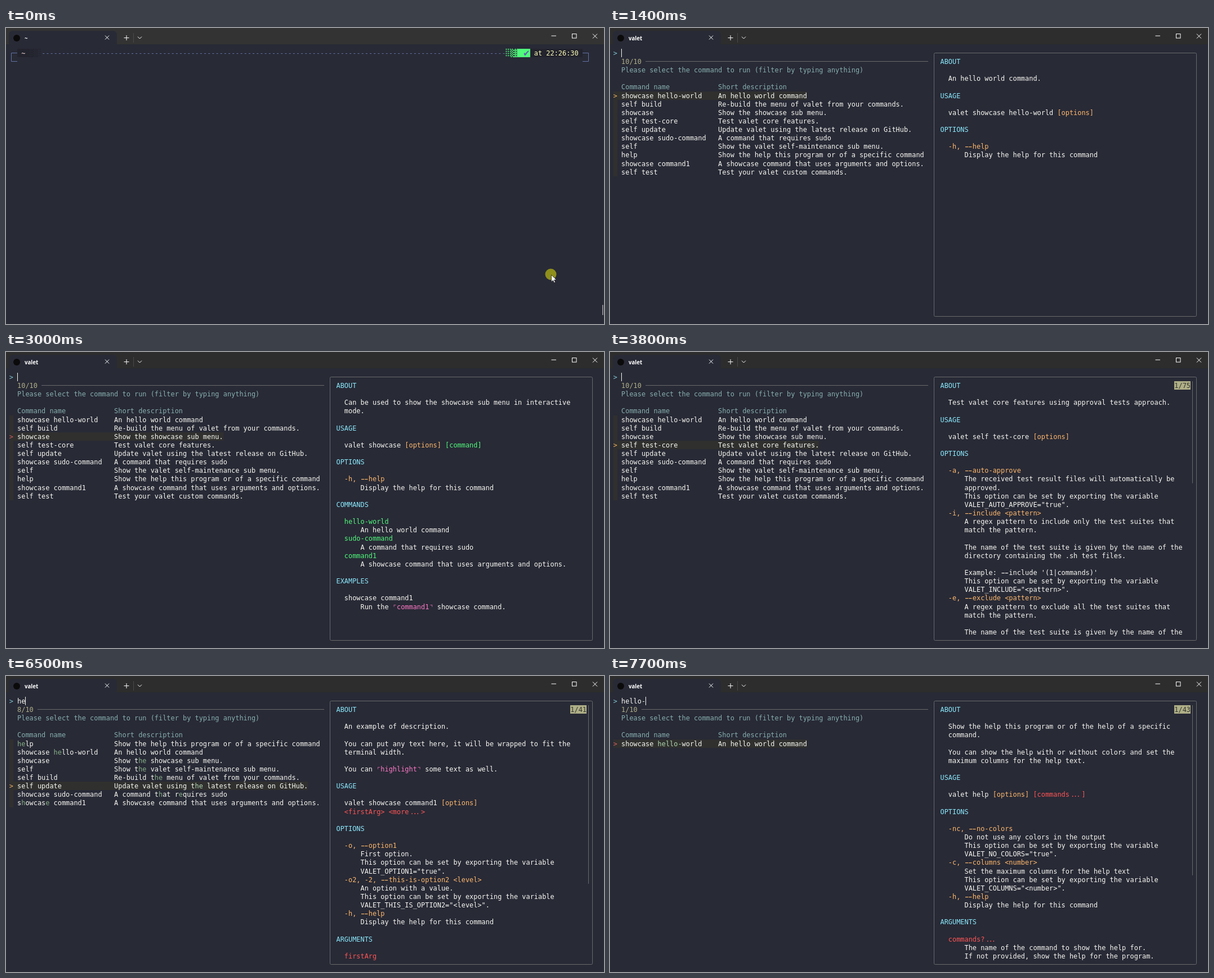
Animation, 1062 px wide and 527 px high, one loop 8000 ms. Source, as an HTML page with a canvas:

```html
<!DOCTYPE html>
<html lang="en">
<head>
<meta charset="utf-8">
<title>Terminal menu</title>
<style>
html, body { margin: 0; width: 100%; height: 100%; overflow: hidden; background: #282a36; }
canvas { display: block; }
</style>
</head>
<body>
<canvas id="stage" width="1062" height="527"></canvas>
<script>
const ctx = document.getElementById('stage').getContext('2d');
const LOOP = 8000, CELL = 7.17, ROW = 15.14, LEFT = 5.7, TOP = 36.9;
const BG = '#282a36', FG = '#f8f8f2', TEAL = '#87afaf', OLIVE = '#afaf87', ORANGE = '#ffb86c',
  RED = '#ff5555', BLUE = '#6272a4', LINE = '#696a6c', SHADE = '#30302f', DARK = '#22232d', GREEN = '#50fa7b';
const INLINE = { o: ORANGE, g: GREEN, r: RED, p: '#ff79c6' };

const ITEMS = [
  ['showcase hello-world', 'An hello world command'],
  ['self build', 'Re-build the menu of valet from your commands.'],
  ['showcase', 'Show the showcase sub menu.'],
  ['self test-core', 'Test valet core features.'],
  ['self update', 'Update valet using the latest release on GitHub.'],
  ['showcase sudo-command', 'A command that requires sudo'],
  ['self', 'Show the valet self-maintenance sub menu.'],
  ['help', 'Show the help this program or of a specific command'],
  ['showcase command1', 'A showcase command that uses arguments and options.'],
  ['self test', 'Test your valet custom commands.'],
].map(([name, text]) => name.padEnd(24) + text);

// Help pages: {x...} colours a span, with x a key of INLINE.
const helpFlag = `  -h, --help
      Display the help for this command`;
const exported = setting => `      This option can be set by exporting the variable
      VALET_${setting}.`;
const page = (about, usage, rest, total) => ({
  total,
  lines: `ABOUT\n\n${about}\n\nUSAGE\n\n  valet ${usage}\n\nOPTIONS\n\n${rest}`.split('\n'),
});

const PAGES = [
  page('  An hello world command.', 'showcase hello-world {o[options]}', helpFlag),
  page(`  This command can be used to re-build the menu / help /
  options / arguments in case you have modified, added or
  removed a valet command definition.

  Please check the examples in the examples.d directory to
  learn how to create your own commands.`, 'self build {o[options]}', `  -c, --core-only
      Build only the core commands.
${exported('CORE_ONLY="true"')}
  -o, --output <path>
      The path to the folder in which to write the
      generated commands file.
${exported('OUTPUT="<path>"')}
${helpFlag}`),
  page(`  Can be used to show the showcase sub menu in interactive
  mode.`, 'showcase {o[options]} {g[command]}', `${helpFlag}

COMMANDS

  {ghello-world}
      An hello world command
  {gsudo-command}
      A command that requires sudo
  {gcommand1}
      A showcase command that uses arguments and options.

EXAMPLES

  showcase command1
      Run the {p⌜command1⌝} showcase command.`),
  page('  Test valet core features using approval tests approach.', 'self test-core {o[options]}', `  -a, --auto-approve
      The received test result files will automatically be
      approved.
${exported('AUTO_APPROVE="true"')}
  -i, --include <pattern>
      A regex pattern to include only the test suites that
      match the pattern.

      The name of the test suite is given by the name of the
      directory containing the .sh test files.

      Example: --include '(1|commands)'
${exported('INCLUDE="<pattern>"')}
  -e, --exclude <pattern>
      A regex pattern to exclude all the test suites that
      match the pattern.

      The name of the test suite is given by the name of the`, 75),
  page('  Update valet using the latest release on GitHub.', 'self update {o[options]}', helpFlag),
  page(`  Before starting this command, valet will check if sudo is
  available.

  If so, it will require the user to enter the sudo password
  and use sudo inside the command`, 'showcase sudo-command {o[options]}', helpFlag),
  page(`  Can be used to show the valet self-maintenance sub menu in
  interactive mode.`, 'self {o[options]} {g[command]}', `${helpFlag}

COMMANDS

  {gbuild}
      Re-build the menu of valet from your commands.
  {gtest-core}
      Test valet core features.
  {gupdate}
      Update valet using the latest release on GitHub.
  {gtest}
      Test your valet custom commands.

EXAMPLES

  self build
      Re-build the menu of valet.
  self test`, 31),
  page(`  Show the help this program or of the help of a specific
  command.

  You can show the help with or without colors and set the
  maximum columns for the help text.`, 'help {o[options]} {r[commands...]}', `  -nc, --no-colors
      Do not use any colors in the output
${exported('NO_COLORS="true"')}
  -c, --columns <number>
      Set the maximum columns for the help text
${exported('COLUMNS="<number>"')}
${helpFlag}

ARGUMENTS

  {rcommands?...}
      The name of the command to show the help for.
      If not provided, show the help for the program.`, 43),
  page(`  An example of description.

  You can put any text here, it will be wrapped to fit the
  terminal width.

  You can {p⌜highlight⌝} some text as well.`, 'showcase command1 {o[options]}\n  {r<firstArg> <more...>}', `  -o, --option1
      First option.
${exported('OPTION1="true"')}
  -o2, -2, --this-is-option2 <level>
      An option with a value.
${exported('THIS_IS_OPTION2="<level>"')}
${helpFlag}

ARGUMENTS

  {rfirstArg}`, 41),
];

const ALL = ITEMS.map((_, i) => i);
const COMMANDS = ['valet', 'vcs_info', 'vdir', 'vi', 'view', 'vigr', 'vim', 'vimdiff', 'vipw', 'vmstat', 'vncserver'];
const MATCHES = ['external command', COMMANDS.map(c => c.padEnd(10)).join('')];
const RECENT = ['valet', 'valet showcase', 'valet showcase command1'];

const shell = (at, typed, hints = []) => ({ at, typed, hints });
const menu = (at, preview, selected, query = '', order = ALL) => ({ at, preview, selected, query, order });
// The preview trails the selection while the user types.
const STATES = [
  shell(0, ''), shell(200, 'v'), shell(400, 'v', MATCHES), shell(600, 'va', MATCHES),
  shell(800, 'val'), shell(1000, 'vale', RECENT), shell(1200, 'valet'),
  menu(1400, 0, 0), menu(2200, 1, 1), menu(3000, 2, 2), menu(3800, 3, 3), menu(4600, 4, 4), menu(5400, 5, 5),
  menu(6200, 5, 5, 'h', [7, 0, 6, 2, 5, 8, 1, 4]),
  menu(6500, 8, 5, 'he', [7, 0, 2, 6, 1, 4, 5, 8]),
  menu(6800, 4, 4, 'hel', [7, 0, 4, 1, 6]),
  menu(7100, 6, 3, 'hell', [0, 4, 6, 7]),
  menu(7400, 7, 2, 'hello', [0, 4, 7]),
  menu(7700, 7, 0, 'hello-', [0]),
];

const colX = col => LEFT + col * CELL;
const rowY = row => TOP + row * ROW;

function rect(color, x, y, w, h) {
  ctx.fillStyle = color;
  ctx.fillRect(x, y, w, h);
}

function fillCells(color, col, row, count) {
  const x = Math.round(colX(col)), y = Math.round(rowY(row));
  rect(color, x, y, Math.round(colX(col + count)) - x, Math.round(rowY(row + 1)) - y);
}

function stroke(color, ...points) {
  ctx.strokeStyle = color;
  ctx.lineWidth = 1;
  ctx.beginPath();
  for (const [x, y] of points) ctx.lineTo(x, y);
  ctx.stroke();
}

function disc(color, x, y, r) {
  ctx.fillStyle = color;
  ctx.beginPath();
  ctx.arc(x, y, r, 0, 7);
  ctx.fill();
}

// One glyph per cell; "--" and "..." are pulled together as ligatures.
function print(text, col, row, color = FG) {
  const y = Math.round(rowY(row) + 11.9);
  ctx.font = "11.9px 'DejaVu Sans Mono', monospace";
  for (let i = 0; i < text.length; i++) {
    const x = colX(col + i);
    ctx.fillStyle = color;
    if (text.startsWith('--', i)) {
      ctx.fillRect(x + 1.5, y - 4, 5.2, 1.2);
      ctx.fillRect(x + 7.7, y - 4, 5.2, 1.2);
      i++;
    } else if (text.startsWith('...', i)) {
      for (let k = 0; k < 3; k++) ctx.fillText('.', x + k * CELL + 2 - k * 2, y);
      i += 2;
    } else if (text[i] !== ' ') {
      ctx.fillText(text[i], x, y);
    }
  }
}

function caret(col, row) {
  rect(FG, Math.round(colX(col)), Math.round(rowY(row)), 1, 15);
}

// Dithered shade block; level 1 to 3 quarters.
function shade(color, col, level) {
  const w = CELL / 4, h = ROW / 8;
  for (let y = 0; y < 8; y++) {
    for (let x = 0; x < 4; x++) {
      const on = level === 2 ? (x + y) % 2 === 0 : (level === 3) !== (x % 2 === 0 && y % 2 === 0);
      if (on) rect(color, colX(col) + x * w, rowY(0) + y * h, w, h);
    }
  }
}

function drawWindow(title, barColor) {
  rect(BG, 0, 0, 1062, 527);
  rect(barColor, 0, 0, 1062, 29);
  ctx.fillStyle = BG;
  ctx.beginPath();
  ctx.roundRect(5, 5, 192, 25, [7, 7, 0, 0]);
  ctx.fill();
  disc('#0b0b0b', 19, 18, 6);
  ctx.font = "700 9.7px 'Open Sans', sans-serif";
  ctx.fillStyle = '#fff';
  ctx.fillText(title, 33, 22);
  const cross = (x, y, r) => {
    stroke('#fff', [x - r, y - r], [x + r, y + r]);
    stroke('#fff', [x - r, y + r], [x + r, y - r]);
  };
  cross(179.5, 17, 3.5);
  cross(1046, 14.5, 4);
  stroke('#fff', [209.5, 17.5], [218.5, 17.5]);
  stroke('#fff', [214, 13], [214, 22]);
  stroke('#4a4a4a', [226.5, 9], [226.5, 26]);
  stroke('#fff', [234, 15.5], [237.5, 19], [241, 15.5]);
  stroke('#fff', [968.5, 14], [977, 14]);
  ctx.strokeRect(1005.5, 10.5, 7.5, 7.5);
}

function drawShell({ at, typed, hints }) {
  drawWindow('~', at ? '#2d2d2d' : '#333333');
  stroke(BLUE, [20, 44.5], [9.5, 44.5], [9.5, 59.5], [20, 59.5]);
  stroke(BLUE, [1024, 44.5], [1034.5, 44.5], [1034.5, 59.5], [1024, 59.5]);
  fillCells(DARK, 2, 0, 3);
  print('~', 3, 0, '#ffdfdf');
  for (let k = 0; k < 3; k++) {
    shade(DARK, 5 + k, 3 - k);
    shade(GREEN, 123 + k, 1 + k);
  }
  for (let col = 8; col < 123; col++) rect(BLUE, colX(col) + 2.2, 45, 3, 1);
  fillCells(GREEN, 126, 0, 3);
  ctx.font = "15px 'DejaVu Sans', sans-serif";
  ctx.fillStyle = '#5f5faf';
  ctx.fillText('✔', 918, 50);
  fillCells(DARK, 129, 0, 13);
  print('at 22:26:30', 130, 0, '#ffffb8');
  print(typed, 3, 1);
  hints.forEach((hint, i) => print(hint, 0, 2 + i));
  rect('#a3a3a3', 1059, 493, 1.5, 18);
  if (typed) caret(3 + typed.length, 1);
  else drawPointer(967.5, 438.5);
}

function drawPointer(x, y) {
  disc('#8f8f1c', x, y, 10);
  ctx.save();
  ctx.translate(x + 1, y + 1);
  const arrow = new Path2D('M0 0V12.5L3 9.8 5 14 7 13 5 9H9Z');
  ctx.fillStyle = '#fff';
  ctx.strokeStyle = '#222';
  ctx.lineWidth = 0.8;
  ctx.fill(arrow);
  ctx.stroke(arrow);
  ctx.restore();
}

// Tightest fuzzy match, preferring word starts.
function findMatch(line, query) {
  let best = [], bestSpan = Infinity;
  for (let start = 0; query && start < line.length; start++) {
    if (line[start] !== query[0]) continue;
    const found = [start];
    for (const ch of query.slice(1)) found.push(line.indexOf(ch, found.at(-1) + 1));
    if (found.some((p, i) => i && p <= found[i - 1])) continue;
    const span = found.at(-1) - start - (start === 0 || line[start - 1] === ' ' ? 0.5 : 0);
    if (span < bestSpan) [best, bestSpan] = [found, span];
  }
  return best;
}

function drawList({ at, query, order, selected }) {
  const count = `${order.length}/${ITEMS.length}`;
  print('>', 0, 0, '#7fc7d0');
  print(query, 2, 0);
  if (at !== 5400) caret(2 + query.length, 0);
  print(count, 2, 1, OLIVE);
  stroke(LINE, [colX(3 + count.length), 59.5], [565, 59.5]);
  print('Please select the command to run (filter by typing anything)', 2, 2, TEAL);
  print('Command name'.padEnd(24) + 'Short description', 2, 4, TEAL);
  order.forEach((item, i) => {
    const line = ITEMS[item], row = 5 + i, current = i === selected;
    fillCells(SHADE, 0, row, current ? line.length + 2 : 1);
    if (current) print('>', 0, row, at === 3000 || at === 7700 ? '#d75f5f' : '#f0b05c');
    const hits = findMatch(line, query);
    [...line].forEach((ch, k) =>
      print(ch, 2 + k, row, !hits.includes(k) ? FG : current ? '#afd7af' : '#87af87'));
  });
}

function drawPreview({ lines, total }) {
  ctx.strokeStyle = LINE;
  ctx.lineWidth = 1;
  ctx.beginPath();
  ctx.roundRect(575.5, 44.5, 466, 469, 2);
  ctx.stroke();
  lines.forEach((line, i) => {
    const base = /^[A-Z]+$/.test(line) ? '#8be9fd' : /^  -/.test(line) ? ORANGE : FG;
    let col = 81;
    for (const part of line.split(/(\{[^}]*\})/)) {
      const marked = part[0] === '{';
      const text = marked ? part.slice(2, -1) : part;
      print(text, col, 1 + i, marked ? INLINE[part[1]] : base);
      col += text.length;
    }
  });
  if (total) {
    fillCells(OLIVE, 139, 1, 4);
    print(`1/${total}`, 139, 1, '#34362f');
    rect(LINE, 1034, 52, 1, Math.floor(900 / total) * ROW);
  }
}

function frame() {
  const t = performance.now() % LOOP;
  const state = STATES.findLast(s => s.at <= t);
  if (state.order) {
    drawWindow('valet', '#2d2d2d');
    drawList(state);
    drawPreview(PAGES[state.preview]);
  } else {
    drawShell(state);
  }
  requestAnimationFrame(frame);
}
frame();
</script>
</body>
</html>
```
